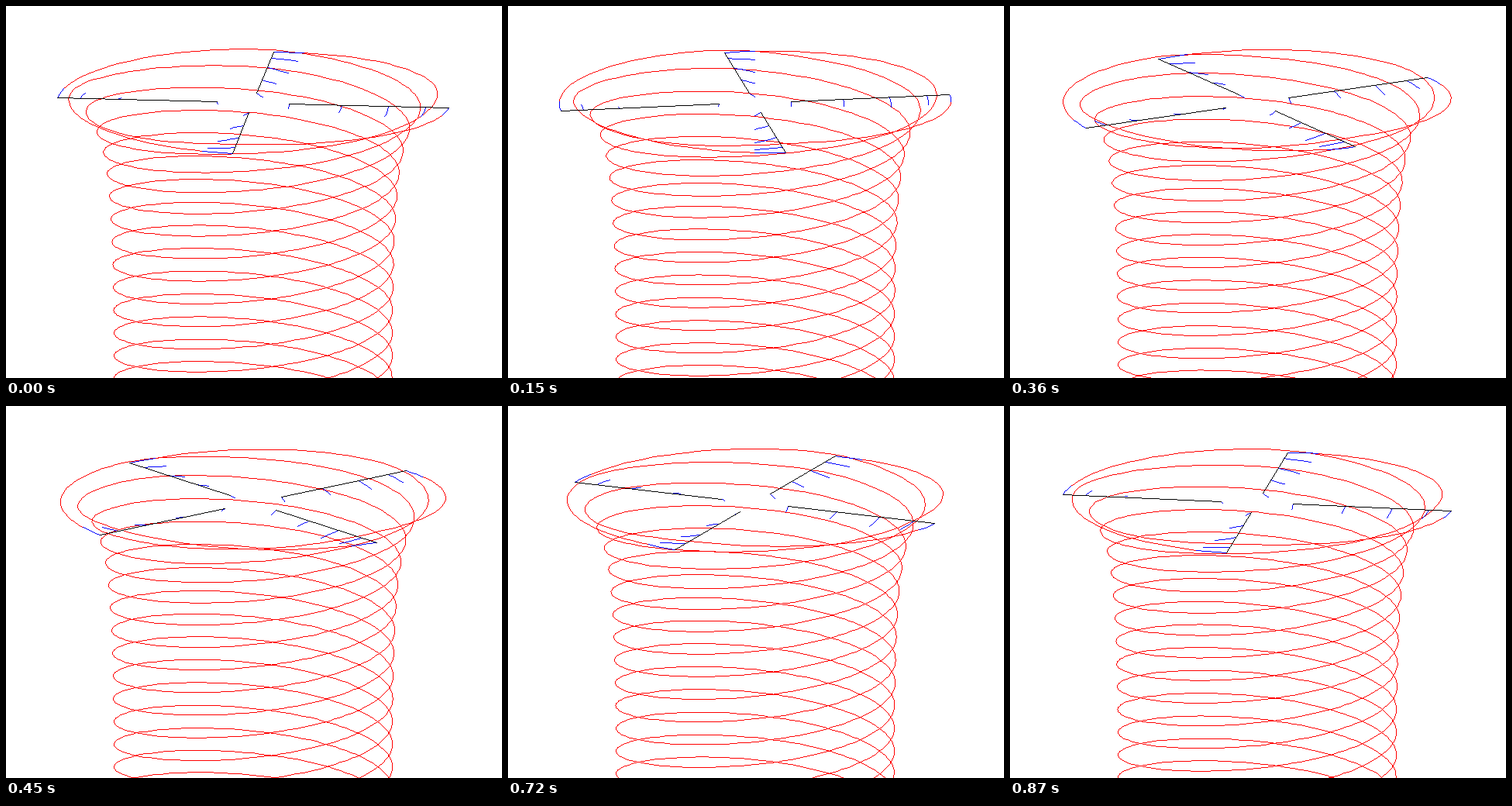
An HTML page with a canvas that plays this animation: 640x480 px, repeating every 0.9 s.

```html
<!DOCTYPE html>
<html>
<head>
<meta charset="utf-8">
<title>Rotor wake</title>
<style>
html, body { margin: 0; width: 100%; height: 100%; overflow: hidden; background: #fff; }
canvas { display: block; }
</style>
</head>
<body>
<canvas id="stage" width="640" height="480"></canvas>
<script>
const ctx = document.getElementById('stage').getContext('2d');
const CX = 318.4, CY = 124.5, RADIUS = 254, ROOT = 47;
const TILT = Math.sin(Math.PI / 12);
const STEP = 3, FRAME_MS = 30, FRAMES = 30, NEAR_WAKE = 9, LAST_AGE = 1500;

// Tip vortex radius and screen drop, every 30 degrees of wake age
const NODE = 30;
const radii = [254, 250, 243.5, 236, 228, 220.3, 214.5, 209.2, 204.8, 200.8, 197.7, 195, 192.8, 191, 189.5];
const drops = [0, -3.6, -6.6, -7.4, -0.8, 4.9, 10.7, 19.4, 28.8, 37.3, 46.5, 55.7, 64.8, 74.1, 83.4];
// Trailing vortices inboard of the tip: [radius, drop at their end]
const trailers = [[ROOT, 4.5], [115, 4.3], [176, 5.6], [224, 2.5]];

const farRadius = age => 179 + 9.2 * Math.exp((450 - age) / 240);
// The wake slows a little towards its open end
const farDrop = age => 0.3267 * age - 54 - 2.5e-5 * Math.max(0, age - 1100) ** 2;

function sample(nodes, far, age) {
  const at = i => i < 0 ? 2 * nodes[0] - nodes[1] : i < nodes.length ? nodes[i] : far(i * NODE);
  const i = Math.floor(age / NODE), t = age / NODE - i;
  const [a, b, c, d] = [at(i - 1), at(i), at(i + 1), at(i + 2)];
  return b + t * (c - a + t * (2 * a - 5 * b + 4 * c - d + t * (3 * (b - c) + d - a))) / 2;
}

const tipWake = [];
for (let age = 0; age <= LAST_AGE; age += STEP) {
  tipWake.push([sample(radii, farRadius, age), sample(drops, farDrop, age)]);
}

function project(radius, azimuth, drop = 0) {
  const a = azimuth * Math.PI / 180;
  return [Math.round(CX + radius * Math.cos(a)), Math.round(CY - TILT * radius * Math.sin(a) + drop)];
}

// One-pixel line without smoothing
function line([x0, y0], [x1, y1], color) {
  ctx.fillStyle = color;
  const n = Math.max(Math.abs(x1 - x0), Math.abs(y1 - y0), 1);
  for (let i = 0; i <= n; i++) {
    ctx.fillRect(Math.round(x0 + (x1 - x0) * i / n), Math.round(y0 + (y1 - y0) * i / n), 1, 1);
  }
}

function polyline(points, color) {
  for (let i = 1; i < points.length; i++) line(points[i - 1], points[i], color);
}

function draw(frame) {
  ctx.fillStyle = '#fff';
  ctx.fillRect(0, 0, 640, 480);
  const blades = [0, 90, 180, 270].map(a => a - 6 + frame * STEP);
  const near = NEAR_WAKE / STEP;

  const helices = blades.map(az => tipWake.map(([r, z], i) => project(r, az - i * STEP, z)));
  helices.forEach(h => polyline(h.slice(near), '#f00'));
  helices.forEach(h => polyline(h.slice(0, near + 1), '#00f'));

  for (const az of blades) {
    for (const [r, z] of trailers) {
      const arc = [];
      for (let i = 0; i <= near; i++) arc.push(project(r, az - i * STEP, z * i / near));
      polyline(arc, '#00f');
    }
  }
  for (const az of blades) line(project(ROOT, az), project(RADIUS, az), '#000');
}

let shown = -1;
const start = performance.now();
function tick() {
  const frame = Math.floor((performance.now() - start) / FRAME_MS) % FRAMES;
  if (frame !== shown) draw(shown = frame);
  requestAnimationFrame(tick);
}
tick();
</script>
</body>
</html>
```
